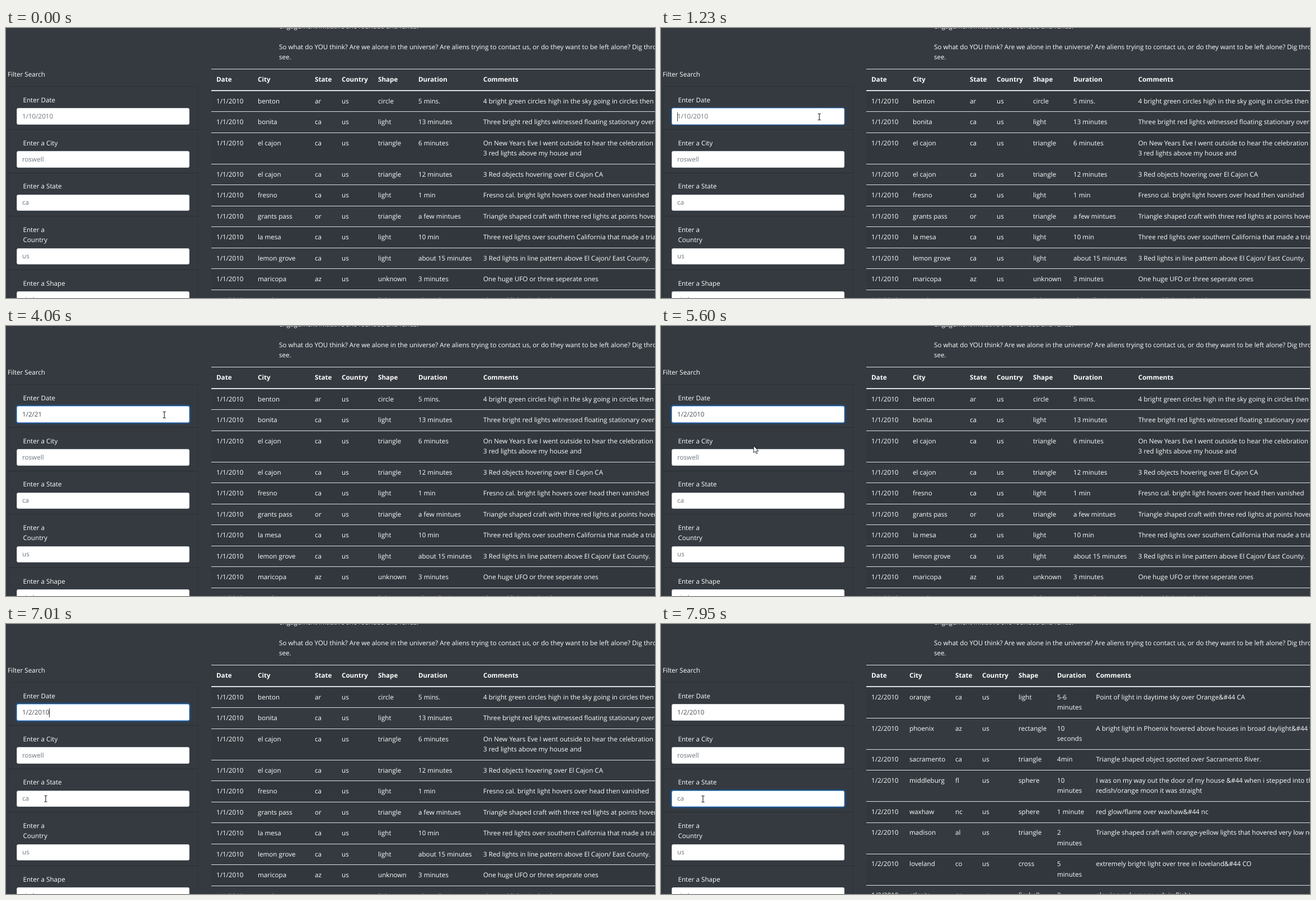
These frames come from a looping animation (1160x483 px, 8000 ms). An HTML page:

```html
<!DOCTYPE html>
<html lang="en">
<head>
<meta charset="utf-8">
<title>Sightings filter</title>
<style>
html, body { margin: 0; width: 100%; height: 100%; overflow: hidden; background: #343a40; }
#stage {
  position: relative; width: 1160px; height: 483px; overflow: hidden; color: #fff;
  font: 11.65px/18.4px "Open Sans", "Noto Sans", sans-serif;
  text-rendering: geometricPrecision; white-space: pre; cursor: default;
}
#stage div, #cursor, .caret, .hint { position: absolute; }
.table { left: 0; top: 0; }
.row { left: 367px; width: 900px; border-top: 1px solid #dee2e6; box-sizing: border-box; }
.row.odd { background: rgba(0, 0, 0, .05); }
.row.head { font-weight: 700; }
.rule { left: 367px; width: 900px; top: 111px; height: 1px; background: #dee2e6; box-shadow: 0 1px rgba(222, 226, 230, .5); }
.item { left: 3px; width: 341px; border: 1px solid rgba(0, 0, 0, .125); box-sizing: border-box; }
.field {
  --focus: 0; left: 19px; width: 309px; height: 29.5px; box-sizing: border-box; border-radius: 3px;
  padding: 5.6px 9px; background: #fff; color: #495057;
  border: 1px solid color-mix(in srgb, #80bdff calc(var(--focus) * 100%), #ced4da);
  box-shadow: 0 0 0 calc(var(--focus) * 2.4px) rgba(0, 123, 255, calc(var(--focus) * .25));
}
.hint { left: 9px; color: #6c757d; }
.caret { width: 1px; height: 16px; margin-top: 1px; background: #333; visibility: hidden; }
#cursor { left: 0; top: 0; overflow: visible; }
</style>
</head>
<body>
<div id="stage">
  <svg id="cursor" width="1" height="1">
    <path id="arrow" d="M0 0V12.2L2.8 9.6 4.7 14 6.7 13.1 4.8 8.9H8.6Z" fill="#fff" stroke="#000" stroke-width=".8"/>
    <path id="beam" d="M-2.5-5.5H-.7L0-5 .7-5.5H2.5M0-5V5M-2.5 5.5H-.7L0 5 .7 5.5H2.5" fill="none" stroke="#000"/>
  </svg>
</div>
<script>
const LOOP = 8000, LINE = 18.4, SWAP = 7290;
const stage = document.getElementById('stage');
const cursor = document.getElementById('cursor');
const arrow = document.getElementById('arrow');
const beam = document.getElementById('beam');

function add(parent, className, style = {}, text = '', tag = 'div') {
  const el = document.createElement(tag);
  el.className = className;
  el.textContent = text;
  for (const key in style) {
    el.style[key] = typeof style[key] === 'number' ? style[key] + 'px' : style[key];
  }
  return parent.appendChild(el);
}

// Text whose first line sits around a visual centre.
const label = (x, centre, text) => add(stage, '', { left: x, top: centre - LINE / 2 + .8 }, text);

label(488, -2.5, 'engagement initiative she founded and funds.');
label(488, 34, 'So what do YOU think? Are we alone in the universe? Are aliens trying to contact us, or do they want to be left alone? Dig through the data and\nsee.');
label(3, 83, 'Filter Search');

const HEAD = 'Date|City|State|Country|Shape|Duration|Comments';

// Rows are "city|state|shape|duration|comments"; "~" breaks a line.
function buildTable(date, columns, rows) {
  const table = add(stage, 'table');
  const addRow = (top, height, cells, kind) => {
    const row = add(table, 'row ' + kind, { top, height });
    cells.forEach((cell, i) =>
      add(row, '', { left: columns[i] - 367, top: 9.8 }, cell.replaceAll('~', '\n')));
  };
  addRow(73, 39, HEAD.split('|'), 'head');
  let top = 111.8;
  rows.trim().split('\n').forEach((line, i) => {
    const [city, state, ...rest] = line.split('|');
    const lines = Math.max(...rest.map(cell => cell.split('~').length));
    const height = 37.53 + (lines - 1) * LINE;
    addRow(top, height, [date, city, state, 'us', ...rest], i % 2 ? '' : 'odd');
    top += height;
  });
  add(table, 'rule');
  return table;
}

const firstTable = buildTable('1/1/2010', [376, 450, 552, 600, 665, 737, 853], `
benton|ar|circle|5 mins.|4 bright green circles high in the sky going in circles then one
bonita|ca|light|13 minutes|Three bright red lights witnessed floating stationary over San Diego
el cajon|ca|triangle|6 minutes|On New Years Eve I went outside to hear the celebration and saw~3 red lights above my house and
el cajon|ca|triangle|12 minutes|3 Red objects hovering over El Cajon CA
fresno|ca|light|1 min|Fresno cal. bright light hovers over head then vanished
grants pass|or|triangle|a few mintues|Triangle shaped craft with three red lights at points hovering
la mesa|ca|light|10 min|Three red lights over southern California that made a triangle
lemon grove|ca|light|about 15 minutes|3 Red lights in line pattern above El Cajon/ East County.
maricopa|az|unknown|3 minutes|One huge UFO or three seperate ones
new haven|ct|light|about 5 minutes|slow red lights in the sky`);

const secondTable = buildTable('1/2/2010', [376, 444, 526, 574, 639, 708, 777.5], `
orange|ca|light|5-6~minutes|Point of light in daytime sky over Orange&#44 CA
phoenix|az|rectangle|10~seconds|A bright light in Phoenix hovered above houses in broad daylight&#44 then
sacramento|ca|triangle|4min|Triangle shaped object spotted over Sacramento River.
middleburg|fl|sphere|10~minutes|I was on my way out the door of my house &#44 when i stepped into the~redish/orange moon it was straight
waxhaw|nc|sphere|1 minute|red glow/flame over waxhaw&#44 nc
madison|al|triangle|2~minutes|Triangle shaped craft with orange-yellow lights that hovered very low near
loveland|co|cross|5~minutes|extremely bright light over tree in loveland&#44 CO
atlanta|ga|fireball|3~minutes|glowing red orange orb in flight`);

function buildForm() {
  let top = 104;
  return [
    ['Enter Date', '1/10/2010'], ['Enter a City', 'roswell'], ['Enter a State', 'ca'],
    ['Enter a\nCountry', 'us'], ['Enter a Shape', 'circle']
  ].map(([name, placeholder]) => {
    const extra = name.includes('\n') ? LINE : 0;
    const y = top + 39 + extra;
    add(stage, 'item', { top, height: 78.4 + extra });
    label(30.5, top + 25, name);
    const el = add(stage, 'field', { top: y });
    const hint = add(el, 'hint', {}, placeholder, 'span');
    const value = add(el, '', {}, '', 'span');
    const caret = add(el, 'caret', {}, '', 'i');
    top += 77.4 + extra;
    return { el, hint, value, caret, y };
  });
}
const fields = buildForm();
const [dateField, , stateField] = fields;
stage.append(cursor);

const TYPING = [[0, ''], [2050, '1'], [2250, '1/'], [2610, '1/2'], [2860, '1/2/'], [3320, '1/2/2'],
  [3500, '1/2/21'], [4240, '1/2/2'], [4520, '1/2/20'], [4700, '1/2/201'], [4930, '1/2/2010']];
const DATE_CARET = [[1130, 1690], [2050, 4060], [4520, 5440], [5960, 6520], [7000, SWAP]];
const STATE_CARET = [[SWAP, 7850]];

// Pointer way points: time, x, y.
const PATH = [[60, 1097, 470], [200, 760, 330], [400, 430, 215], [550, 315, 172], [720, 283, 159],
  [5420, 283, 159], [5600, 166, 214], [5800, 92, 300], [6000, 60, 372], [6240, 70, 408],
  [6500, 70, 408], [6750, 68, 350], [7010, 71, 312.5], [7840, 71, 312.5], [7950, 75, 313]];

const within = (t, spans) => spans.some(([from, to]) => t >= from && t < to);
const show = (el, on) => { el.style.visibility = on ? 'visible' : 'hidden'; };
const ease = (t, start, length) => {
  const p = Math.min(1, Math.max(0, (t - start) / length));
  return p * p * (3 - 2 * p);
};

function pointAt(t) {
  const next = PATH.findIndex(point => point[0] > t);
  if (next < 0) return PATH.at(-1).slice(1);
  if (next === 0) return PATH[0].slice(1);
  const [t0, x0, y0] = PATH[next - 1], [t1, x1, y1] = PATH[next];
  const p = (t - t0) / (t1 - t0);
  return [x0 + (x1 - x0) * p, y0 + (y1 - y0) * p];
}

function render(t) {
  const typed = TYPING.findLast(([start]) => t >= start)[1];
  dateField.value.textContent = typed;
  show(dateField.hint, !typed);
  show(dateField.caret, within(t, DATE_CARET));
  show(stateField.caret, within(t, STATE_CARET));
  dateField.el.style.setProperty('--focus', ease(t, 1110, 190) - ease(t, SWAP - 20, 160));
  stateField.el.style.setProperty('--focus', ease(t, SWAP - 20, 160));
  firstTable.style.display = t < SWAP ? '' : 'none';
  secondTable.style.display = t < SWAP ? 'none' : '';

  const [x, y] = pointAt(t);
  const overField = x > 19 && x < 328 && fields.some(f => y > f.y && y < f.y + 29);
  cursor.style.transform = `translate(${x}px, ${y}px)`;
  show(arrow, t >= 60 && !overField);
  show(beam, t >= 60 && overField);
}

const start = performance.now();
function tick() {
  render((performance.now() - start) % LOOP);
  requestAnimationFrame(tick);
}
tick();
</script>
</body>
</html>
```
